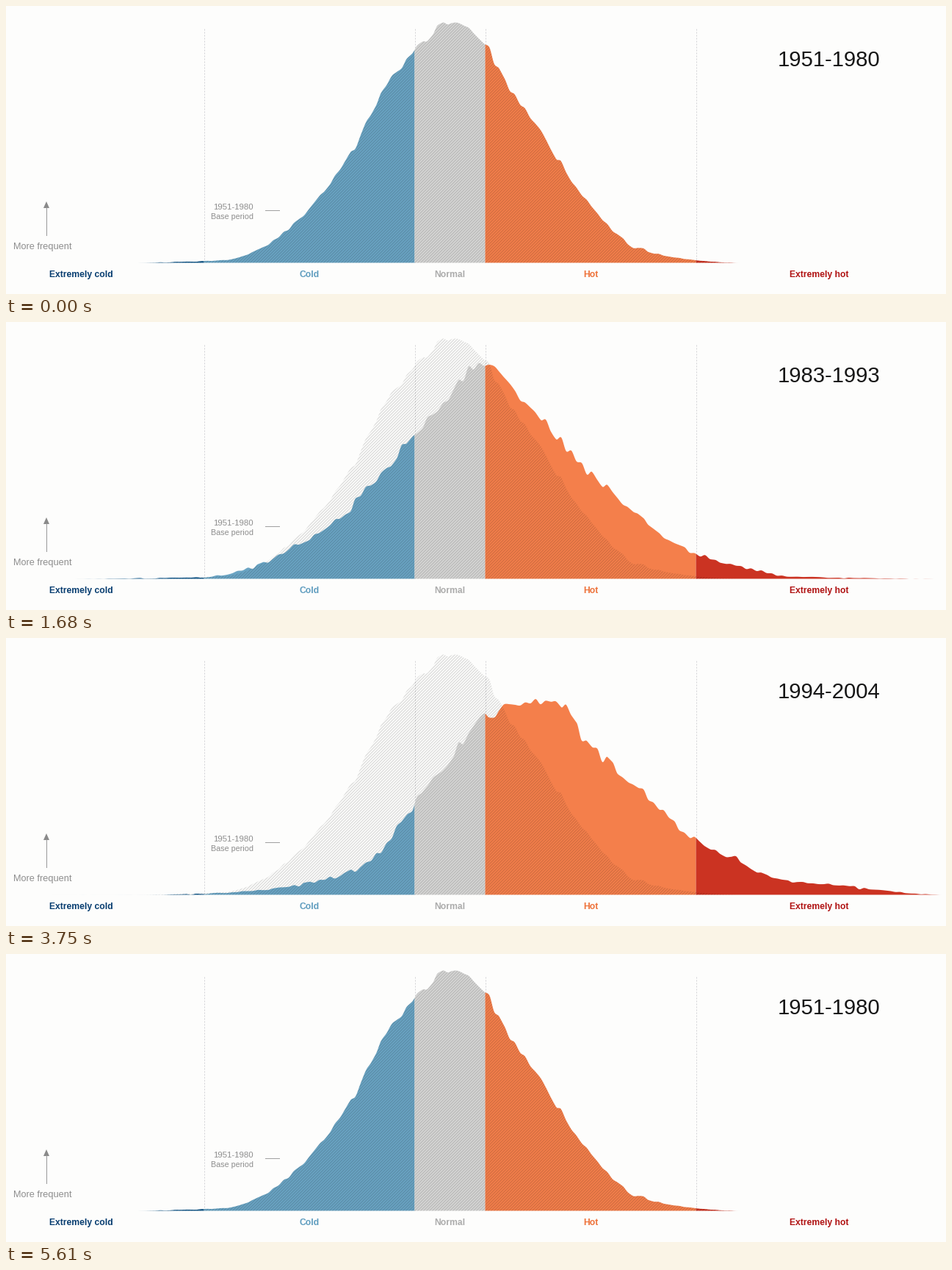
Write a matplotlib script that moves like this. It is 1280x392 px and loops after 5640 ms.

```python
import numpy as np
import matplotlib.pyplot as plt
from matplotlib.animation import FuncAnimation
from matplotlib.collections import LineCollection
from matplotlib.patches import Polygon

W, H, DPI = 1280, 392, 100
PX = 72 / DPI
FRAME_MS, LOOP_MS = 30, 5640
MOVE_MS, STARTS = 180, (845, 2285, 3715, 5150)
FLOOR = 349.5
X = np.linspace(0, W, 2 * W + 1)
EDGES = (0, 269.5, 556.5, 652.5, 939.5, W)
FILLS = ("#155a8c", "#6aa4c3", "#d6d6d5", "#f47f4b", "#cb3322")
LABELS = (("Extremely cold", 102.5, "#073d70"), ("Cold", 413, "#5f9dbf"),
          ("Normal", 604.5, "#acacac"), ("Hot", 796, "#ee7138"),
          ("Extremely hot", 1107, "#b01212"))


def smooth(x, y):
    """Monotone cubic through the points, sampled at X."""
    x, y = np.asarray(x, float), np.asarray(y, float)
    h = np.diff(x)
    d = np.diff(y) / h
    a, b = d[:-1], d[1:]
    same = a * b > 0
    m = np.zeros_like(x)
    m[1:-1] = np.where(same, 2 * a * b / np.where(same, a + b, 1), 0)
    i = np.clip(np.searchsorted(x, X) - 1, 0, len(h) - 1)
    t = np.clip((X - x[i]) / h[i], 0, 1)
    s = t * t * (3 - 2 * t)
    bend = t * (1 - t) * h[i] * (m[i] * (1 - t) - m[i + 1] * t)
    return y[i] * (1 - s) + y[i + 1] * s + bend


def ridge(seed, roughness, *points):
    """Bell shape through (x, height) points, roughened like counted data."""
    height = smooth(*zip(*points))
    knots = np.arange(0, W + 8, 7)
    noise = smooth(knots, np.random.default_rng(seed).normal(size=len(knots)))
    rough = height + roughness * np.sqrt(np.maximum(height, 0)) * noise
    return FLOOR - np.maximum(rough, 0)


BASE = ridge(1, 0.2, (172, 0), (300, 4), (340, 16), (390, 51), (470, 150), (515, 236),
             (556, 289), (605, 327), (650, 300), (685, 240), (733, 170), (790, 85),
             (860, 20), (940, 3.5), (1000, 0))
EIGHTIES = ridge(2, 0.3, (85, 0), (269, 2), (320, 11), (430, 65), (490, 120),
                 (545, 182), (600, 245), (650, 294), (735, 206), (850, 95),
                 (940, 33), (1000, 17), (1070, 3), (1274, 0))
NINETIES = ridge(3, 0.3, (195, 0), (320, 4), (450, 26), (500, 50), (550, 117),
                 (600, 180), (653, 247), (740, 264), (790, 211), (850, 152),
                 (940, 72), (1000, 44), (1050, 21), (1120, 14), (1274, 0))
RECENT = ridge(4, 0.3, (13, 0), (330, 2), (420, 9), (470, 20), (540, 64), (600, 107),
               (650, 175), (700, 233), (750, 248), (800, 232), (850, 203),
               (950, 115), (1000, 68), (1060, 38), (1130, 18), (1274, 0))

CURVES = (BASE, EIGHTIES, NINETIES, RECENT, BASE)
YEARS = np.array([(1951, 1980), (1983, 1993), (1994, 2004), (2005, 2015), (1951, 1980)])

fig = plt.figure(figsize=(W / DPI, H / DPI), dpi=DPI, facecolor="#fdfdfc")
ax = fig.add_axes((0, 0, 1, 1))
ax.set(xlim=(0, W), ylim=(H, 0))
ax.axis("off")


def label(x, y, text, size, color, **kw):
    return ax.text(x, y, text, fontsize=size * PX, color=color,
                   family="Liberation Sans", va="baseline", **kw)


def outline(y, left=0, right=W):
    part = (X >= left) & (X <= right)
    top = np.column_stack((X[part], y[part]))
    return np.vstack(((left, FLOOR), top, (right, FLOOR)))


for x in EDGES[1:-1]:
    ax.plot((x, x), (31, FLOOR), color="#d3d3d6", lw=PX, dashes=(2, 2), zorder=1)

zones = [ax.add_patch(Polygon(outline(BASE, a, b), fc=color, lw=0, zorder=2))
         for a, b, color in zip(EDGES, EDGES[1:], FILLS)]

clip = ax.add_patch(Polygon(outline(BASE), fc="none", ec="none"))
hatch = LineCollection([((x, 350), (x + 345, 5)) for x in range(-180, 1000, 4)],
                       colors="#000000", alpha=0.14, linewidths=1.2 * PX, zorder=4)
ax.add_collection(hatch, autolim=False)
hatch.set_clip_path(clip)

for text, x, color in LABELS:
    label(x, 369, text, 12.1, color, weight="bold", ha="center")
label(10, 331, "More frequent", 12.8, "#8e8e8e")
label(337, 277, "1951-1980", 11.4, "#8e8e8e", ha="right")
label(337, 290.5, "Base period", 10.8, "#8e8e8e", ha="right")
ax.plot((352.5, 371.5), (278, 278), color="#a0a0a0", lw=PX)
ax.plot((55, 55), (274, 312), color="#999999", lw=PX)
ax.add_patch(Polygon([(55, 266), (51, 275), (59, 275)], fc="#8a8a8a", lw=0))
title = label(1120.5, 81.5, "", 29.2, "#161616", ha="center")


def ease(t):
    t = min(max(t, 0), 1)
    return 4 * t ** 3 if t < 0.5 else 1 - 4 * (1 - t) ** 3


def blend(states, weights):
    return states[0] + sum(w * (b - a) for w, a, b in zip(weights, states, states[1:]))


def update(frame):
    now = frame * FRAME_MS
    weights = [ease((now - start) / MOVE_MS) for start in STARTS]
    y = blend(CURVES, weights)
    for zone, a, b in zip(zones, EDGES, EDGES[1:]):
        zone.set_xy(outline(y, a, b))
    first, last = np.rint(blend(YEARS, weights)).astype(int)
    title.set_text(f"{first}-{last}")
    return [*zones, title]


anim = FuncAnimation(fig, update, frames=LOOP_MS // FRAME_MS, interval=FRAME_MS,
                     repeat=True, repeat_delay=0)
plt.show()
```
